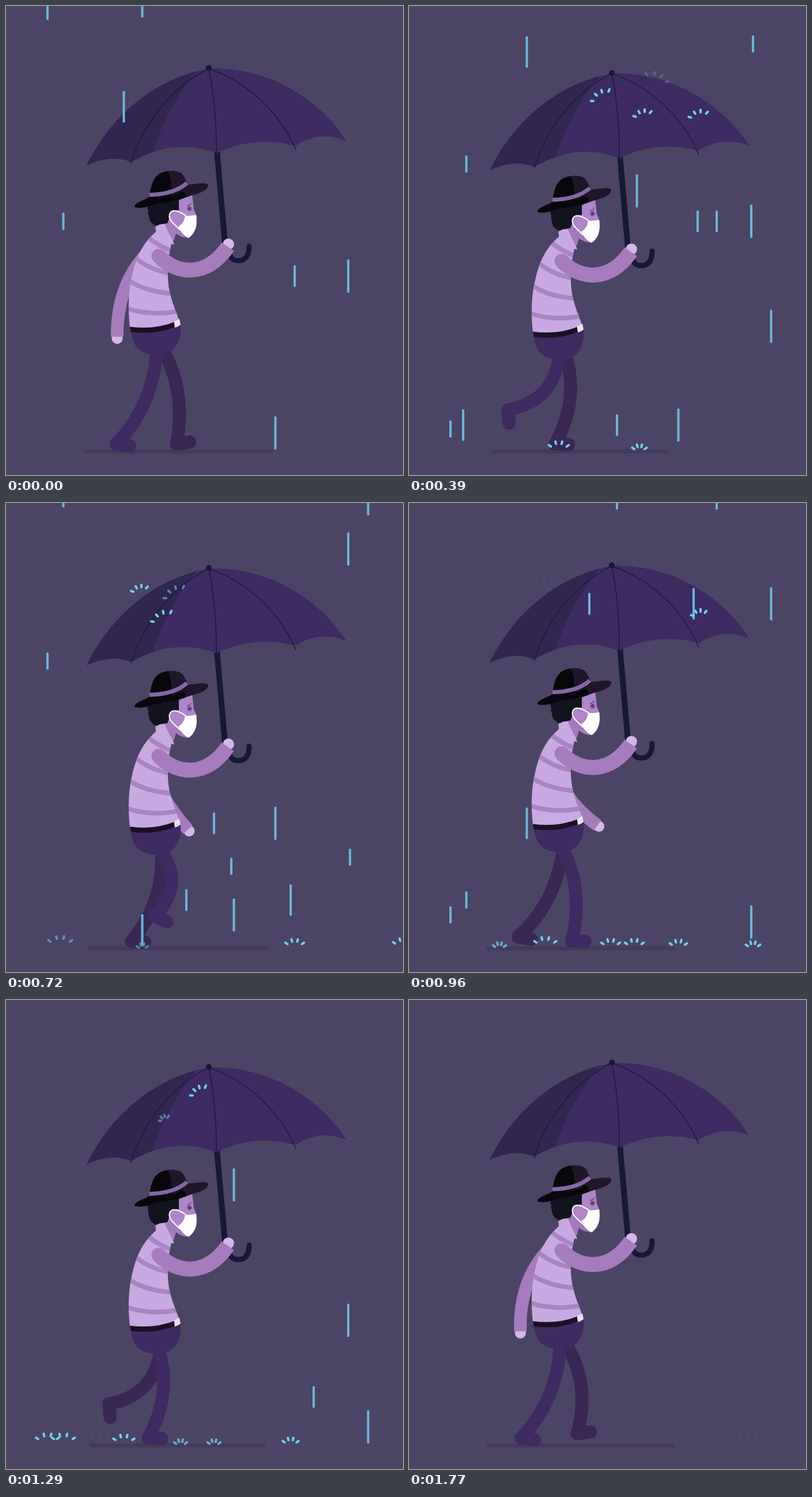
These frames come from a looping animation (689x813 px, 1800 ms). An HTML page with a canvas:

```html
<!DOCTYPE html>
<html lang="en">
<head>
<meta charset="utf-8">
<title>Walk in the rain</title>
<style>
html, body { margin: 0; width: 100%; height: 100%; overflow: hidden; background: #4c4464; }
canvas { display: block; }
</style>
</head>
<body>
<canvas id="stage" width="689" height="813"></canvas>
<script>
const ctx = document.getElementById('stage').getContext('2d');
const LOOP = 1800, STEP = 30, STEPS = LOOP / STEP, HALF = LOOP / 2;
const GROUND = 773, SPLASH_LIFE = 12;
const { PI, sin, cos, abs, hypot } = Math;
const C = {
  bg: '#4c4464', ground: '#443a5b', cloth: '#3d2b62', clothDark: '#30264f', rib: '#1b163f',
  pole: '#161838', pants: '#3e2b62', pantsFar: '#392853', shirt: '#c9a9e1', stripe: '#a985c1',
  sleeve: '#a67cbd', hand: '#d3b7ea', skin: '#af86c9', neck: '#a47abc', hair: '#13121f',
  hat: '#08070c', hatLight: '#20162a', band: '#8468a7', belt: '#1a1122', rain: '#67b8dc', splash: '#70d1f7'
};

// Drops: x, number of falls, step of the last landing, steps per fall
const DROPS = [
  [594, 4, 47], [236.5, 2, 24], [501, 2, 19], [99.5, 3, 34],
  [628.5, 8, 57, 7], [204.5, 3, 36], [361, 3, 42], [72, 2, 34, 20],
  [467.5, 3, 28], [494, 2, 40], [313, 3, 54], [391, 1, 27],
  [395.5, 2, 57, 30], [94, 1, 14], [534, 6, 44, 7], [597, 1, 30, 26]
];
const DROP_SIZES = [58, 55, 38, 30];
// Ground splashes without a visible drop: x, first step
const STRAYS = [[260, 7], [400, 11], [689, 18], [350, 27], [157, 31], [303, 42]];
// Places hit on the umbrella: x, y, tilt, first steps
const HITS = [
  [425, 138, 21, 2], [339, 166, -32, 5, 38], [505, 199, -15, 7, 29], [408, 197, -15, 8],
  [299, 167, -31, 14], [276, 209, -27, 15, 43], [234, 158, -15, 20]
];

const mod = (a, n) => ((a % n) + n) % n;
const smooth = u => u * u * (3 - 2 * u);

function fill(d, color) {
  ctx.fillStyle = color;
  ctx.fill(new Path2D(d));
}
function line(d, color, width, cap = 'butt') {
  ctx.strokeStyle = color;
  ctx.lineWidth = width;
  ctx.lineCap = cap;
  ctx.lineJoin = 'round';
  ctx.stroke(new Path2D(d));
}
function dot(x, y, r, color) {
  ctx.fillStyle = color;
  ctx.beginPath();
  ctx.arc(x, y, r, 0, 7);
  ctx.fill();
}
function clipped(d, draw) {
  ctx.save();
  ctx.clip(new Path2D(d));
  draw();
  ctx.restore();
}

// The foot lifts and swings forward for half a loop, then slides back on the ground
function stride(time) {
  const t = mod(time, LOOP);
  if (t > HALF) {
    const u = t / HALF - 1;
    return { x: 289 - 97.5 * u, y: 759.5, toe: 8 * u * u, bend: 32 + 5 * sin(PI * u), knee: 665 + 25 * u };
  }
  const u = t / HALF, s1 = sin(PI * u), s2 = sin(2 * PI * u), s3 = sin(3 * PI * u);
  return {
    x: 191.5 + 97.5 * u - 53 * s1 - 17 * s2 + 4 * s3,
    y: 759 - 62 * s1 + 10 * s2 + 3 * s3,
    toe: 88 * s1 * s1 + 8 * (1 - 2 * u),
    bend: 31 + 13 * s1 - 17 * s2,
    knee: 690 - 25 * u + 14 * s2
  };
}

function leg(time, dx, bob, color) {
  const { x, y, toe, bend, knee } = stride(time), a = toe * PI / 180;
  ctx.save();
  ctx.translate(dx, 0);
  line(`M262 ${590 + bob}Q${(262 + x) / 2 + bend} ${knee} ${x} ${y}`, color, 22.5, 'round');
  line(`M${x} ${y}l${23 * cos(a)} ${23 * sin(a)}`, color, 23, 'round');
  ctx.restore();
}

function farArm(time) {
  const a = time / LOOP * PI * 2, c = cos(a), s = sin(a);
  const x = 262 - 69 * c, y = 574 + 8.5 * c - 6.5 * c * c;
  const bx = 228 - 36 * c + 16 * s, by = 498 - 12 * c;
  const len = hypot(x - bx, y - by);
  dot(x, y, 9.5, C.hand);
  line(`M243 430Q${bx} ${by} ${x - 3 * (x - bx) / len} ${y - 3 * (y - by) / len}`, C.sleeve, 22);
}

function torso() {
  fill('M216 560C219 580 223 604 262 604C292 604 306 582 303 550Z', C.pants);
  fill('M258 384L284 364L296 390L292 404L287 413Z', C.neck);
  const shirt = 'M260 381C263 378 270 377 276 378C280 390 288 402 292 413L287 412C284 426 280 440 281 470' +
    'C282 500 292 520 300 543C280 556 250 560 215 557C211 520 213 490 219 466C227 430 240 408 260 391Z';
  fill(shirt, C.shirt);
  clipped(shirt, () => {
    for (const d of ['M244 398Q262 415 290 425', 'M222 434Q248 457 286 463', 'M210 473Q240 495 290 498', 'M208 523Q250 538 300 528'])
      line(d, C.stripe, 8);
  });
  fill('M215 555.5Q258 561 293 547L293 556Q258 570 217 564.5Z', C.belt);
  fill('M291.5 546.5L301 542L303 552Q298 556 293 557Z', '#ecdff8');
}

function head() {
  fill('M297 338L323 325C324 334 325 344 326 352L331 364L318 401C306 402 296 392 288 382L283 366Z', C.skin);
  fill('M287 374L300 386L314 401C302 400 294 394 288 387Z', C.neck);
  dot(318.5, 351, 5, '#9c74b6');
  dot(318.5, 351, 3.2, '#5c3f72');
  line('M314 346Q320 346 321 341', '#4b3160', 1.2);
  fill('M246 343L300 332L300 354C292 352 284 358 284 366L280 376Q270 378 260 379Q250 377 248 366Z', C.hair);
  for (let i = 0; i < 4; i++) dot(252 + i * i, 350 + 8 * i, 6.5, C.hair);
  fill('M311 363Q296 350 286 357Q280 365 288 375L300 383Z', C.skin);
  fill('M311 363Q321 364 330 361.5C332 374 332 391 317 401.5C309 398 303 391 299 382Q309 377 311 363Z', '#fff');
  line('M312 363C300 355 290 351 285 358C279 370 291 376 302 388', '#fff', 2);

  const crown = 'M249 330C251 314 254 300 264 292C275 284 296 283 305 290C311 296 312 302 316 309C305 326 275 336 249 330Z';
  const brim = 'M223 346C228 338 243 336 249 330C276 334 303 322 316 309C328 309 352 303 351 311' +
    'C349 322 330 325 313 331C292 339 262 341 246 347C236 350 222 350 223 346Z';
  fill(brim, C.hatLight);
  clipped(brim, () => fill('M220 352V325H286C300 318 314 320 312 330L300 350Z', C.hat));
  fill(crown, C.hatLight);
  clipped(crown, () => fill('M240 340V280H276Q288 290 288 330Z', C.hat));
  line('M249 327Q292 326 314 306.5', C.band, 7);
}

function umbrella() {
  line('M366 250L380 411', C.pole, 10);
  line('M384 418C388 436 393 441 403 441C416 441 422 432 422 416', C.pole, 9, 'round');
  const canopy = 'M140 276C182 190 258 125 352 108C462 104 551 169 591 234C562 221 531 223 503 242' +
    'C458 230 412 232 365 255C318 237 270 240 217 270C193 260 167 263 140 276Z';
  fill(canopy, C.cloth);
  clipped(canopy, () => fill('M120 290V90H352C310 130 275 190 253 256L217 290Z', C.clothDark));
  line('M352 108C284 142 237 206 217 273', C.rib, 1.3);
  line('M352 108Q366 180 365 256', C.rib, 1.3);
  line('M352 108C426 134 478 190 503 249', C.rib, 1.3);
  dot(352, 107, 5, C.pole);
}

function nearArm() {
  dot(386, 412.5, 9.8, C.hand);
  dot(265, 433, 12.5, C.sleeve);
  line('M265 433C298 466 348 470 385 417', C.sleeve, 26);
}

function splash(x, y, tilt, age) {
  if (age < 0 || age > SPLASH_LIFE) return;
  const e = 1 - (1 - age / SPLASH_LIFE) ** 1.5;
  ctx.save();
  ctx.translate(x, y);
  ctx.rotate(tilt * PI / 180);
  ctx.globalAlpha = Math.min(1, 0.5 + age / 4, ((SPLASH_LIFE + 1 - age) / 4) ** 2);
  for (const side of [-1, 1]) {
    const dash = (px, py, dx, dy) =>
      line(`M${side * (px - dx)} ${py - dy}L${side * (px + dx)} ${py + dy}`, C.splash, 4, 'round');
    dash(8 + 11.5 * e, -3.5 - 11 * e, 1.8, -1.2);
    dash(3 + 3.6 * e, -7.5 - 13 * e, 0.6, -2.1);
  }
  ctx.restore();
}

function rain(step) {
  DROPS.forEach(([x, falls, last, pace = 14], i) => {
    const first = last - falls * pace;
    if (step > first && step <= last) {
      const u = (mod(step - first, pace) || pace) / pace;
      const y = -192 + 932 * smooth(u), half = DROP_SIZES[i % 4] / 2 - 2;
      line(`M${x} ${y - half}V${y + half}`, C.rain, 4, 'round');
    }
    // Only splashes that fade before the loop restarts
    if (last + SPLASH_LIFE < STEPS) splash(x, GROUND, 0, step - last);
  });
  for (const [x, first] of STRAYS) splash(x, GROUND, 0, step - first);
  for (const [x, y, tilt, ...starts] of HITS)
    for (const first of starts) splash(x, y, tilt, step - first);
}

function draw(step) {
  const time = step * STEP;
  const bob = 9.4 * abs(sin(PI * (time - 18) / HALF)) ** 1.15;
  ctx.fillStyle = C.bg;
  ctx.fillRect(0, 0, 689, 813);
  line(`M${136.5 + 1.35 * bob} 772H${460.5 - 1.55 * bob}`, C.ground, 7, 'round');
  const body = (...parts) => {
    ctx.save();
    ctx.translate(0, bob);
    parts.forEach(part => part(time));
    ctx.restore();
  };
  body(farArm);
  leg(time + HALF, 7, bob, C.pantsFar);
  leg(time, 0, bob, C.pants);
  body(torso, head, umbrella, nearArm);
  rain(step);
}

const start = performance.now();
function tick() {
  draw(Math.floor(mod(performance.now() - start, LOOP) / STEP));
  requestAnimationFrame(tick);
}
tick();
</script>
</body>
</html>
```
